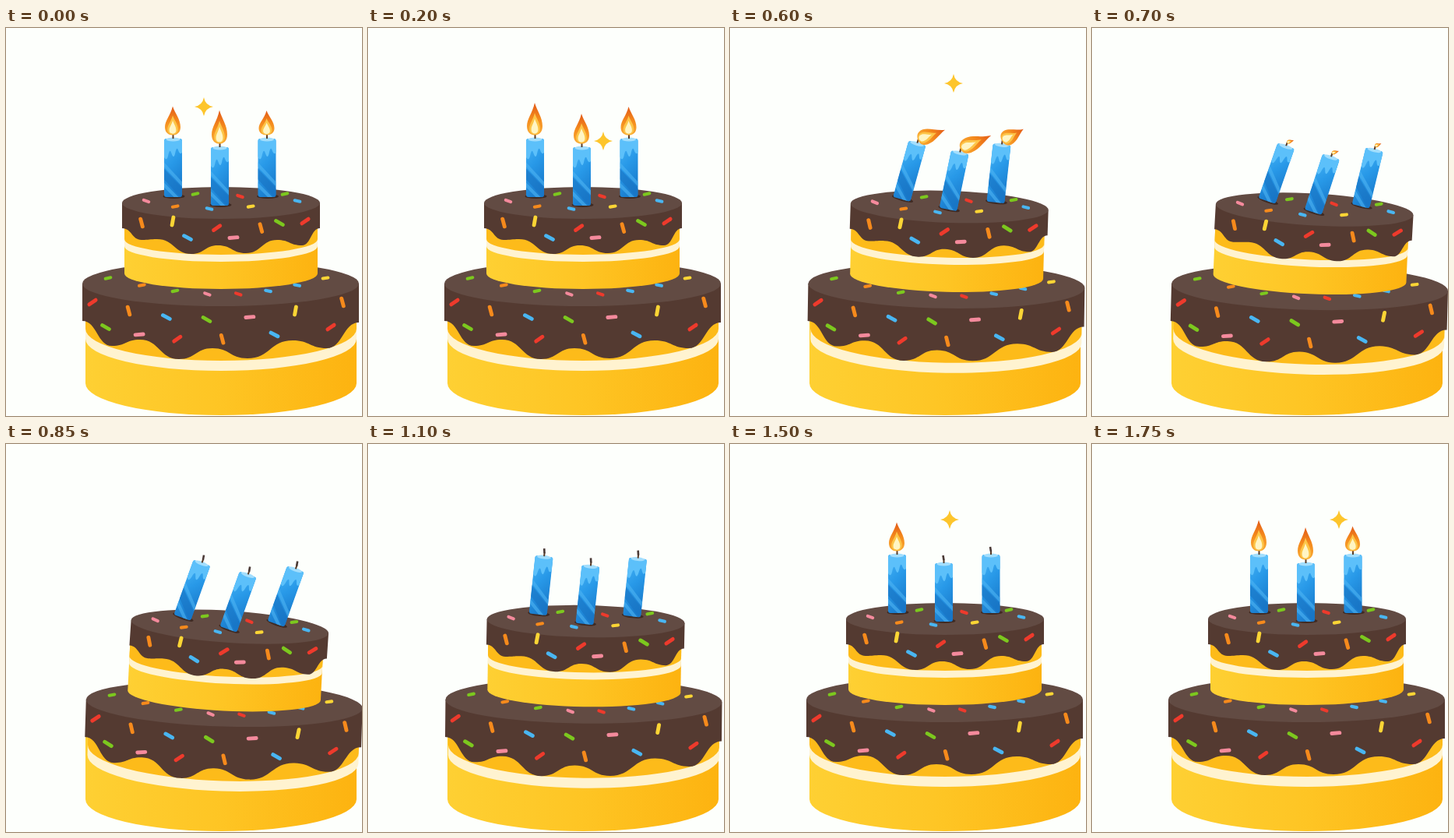
An HTML page that plays this animation: 457x498 px, repeating every 1800 ms.

```html
<!DOCTYPE html>
<html lang="en">
<head>
<meta charset="utf-8">
<title>Birthday cake</title>
<style>
  html, body { margin: 0; width: 100%; height: 100%; overflow: hidden; background: #fdfffc; }
  svg { display: block; width: 457px; height: 498px; }
</style>
</head>
<body>
<svg viewBox="0 0 457 498">
  <defs>
    <linearGradient id="sponge">
      <stop offset="0" stop-color="#fed033"/>
      <stop offset=".5" stop-color="#fec524"/>
      <stop offset="1" stop-color="#fdb310"/>
    </linearGradient>
    <linearGradient id="wax" x2=".35" y2="1">
      <stop offset="0" stop-color="#48b4f5"/>
      <stop offset=".5" stop-color="#2899e8"/>
      <stop offset="1" stop-color="#1a7ccd"/>
    </linearGradient>
    <linearGradient id="fire" x2="0" y2="1">
      <stop offset="0" stop-color="#e25a18"/>
      <stop offset=".5" stop-color="#f48a1c"/>
      <stop offset="1" stop-color="#f9ac35"/>
    </linearGradient>
    <clipPath id="stick"><rect x="-11.5" y="-74" width="23" height="75" rx="3"/></clipPath>
    <path id="drop" d="M0-40C3-30 10-22 10-11C10-3 5 0 0 0S-10-3-10-11C-10-20-3-27 0-40Z"/>
    <g id="flame">
      <use href="#drop" fill="url(#fire)"/>
      <use href="#drop" fill="#fdc548" transform="translate(0 -1) scale(.68 .66)"/>
      <use href="#drop" fill="#fff5c4" transform="translate(0 -2) scale(.44 .46)"/>
    </g>
    <g id="candle">
      <ellipse cx="1" rx="14" ry="3" fill="#3f2a23"/>
      <g clip-path="url(#stick)">
        <path d="M-12-74H12V4H-12Z" fill="url(#wax)"/>
        <path d="M-12-36L12-10V4L-12-22Z" fill="#1873c4" opacity=".6"/>
        <path d="M-12-44L12-18V-12L-12-38ZM-12-18L8 2H2L-12-12Z" fill="#4db4f4" opacity=".6"/>
        <path d="M-12-74H12V-57Q9-52 7-58Q5-65 3-57Q1-46-2-55Q-4-62-6-54Q-8-43-12-51Z" fill="#5cc0fa"/>
      </g>
      <ellipse cy="-73" rx="9" ry="2.4" fill="#a3defd"/>
      <path d="M0-74V-79" stroke="#5a3c28" stroke-width="2"/>
    </g>
  </defs>
  <g id="scene"></g>
  <path id="spark" fill="#fdc52c" d="M0-12Q1.8-1.8 12 0Q1.8 1.8 0 12Q-1.8 1.8-12 0Q-1.8-1.8 0-12Z"/>
</svg>
<script>
const LOOP = 1800, STEP = 50;
const scene = document.getElementById('scene'), spark = document.getElementById('spark');

function add(parent, tag, attrs = {}) {
  const el = document.createElementNS('http://www.w3.org/2000/svg', tag);
  for (const k in attrs) el.setAttribute(k, attrs[k]);
  return parent.appendChild(el);
}

// Cylinder wall with a rounded front edge at both ends
function band(parent, [x0, x1], bow, top, bottom, fill) {
  const arc = (sweep, x, y) => `A${(x1 - x0) / 2} ${bow} 0 0 ${sweep} ${x} ${y}`;
  add(parent, 'path', { fill, d: `M${x0} ${top}${arc(0, x1, top)}V${bottom}${arc(1, x0, bottom)}Z` });
}

// Sponge wall, filled up to its straight upper edge
function sponge(parent, [x0, x1], bow, top, bottom, fill) {
  add(parent, 'path', { fill, d: `M${x0} ${top}V${bottom}A${(x1 - x0) / 2} ${bow} 0 0 0 ${x1} ${bottom}V${top}Z` });
}

// Icing whose lower edge swings smoothly between the given crests
function icing(parent, cy, ry, crests) {
  const [x0, y0] = crests[0], x1 = crests[crests.length - 1][0];
  let d = `M${x0} ${cy}V${y0}`;
  for (let i = 1; i < crests.length; i++) {
    const [px, py] = crests[i - 1], [x, y] = crests[i], mid = (px + x) / 2;
    d += `C${mid} ${py} ${mid} ${y} ${x} ${y}`;
  }
  add(parent, 'path', { d: d + `V${cy}Z`, fill: '#543a31' });
  add(parent, 'ellipse', { cx: (x0 + x1) / 2, cy, rx: (x1 - x0) / 2, ry, fill: '#624b43' });
}

// Each colour has its own angle on the side and on the top
const sugar = {
  p: { color: '#f48a9c', side: -5, top: 20 },
  g: { color: '#7cc81e', side: 30, top: -12 },
  r: { color: '#ee3a2c', side: -35, top: 18 },
  o: { color: '#f68a1c', side: 75, top: -11 },
  b: { color: '#49b6f2', side: 28, top: 12 },
  y: { color: '#fbd535', side: -80, top: -9 }
};

// A row of sprinkles from x0 to x1, sagging by `sag` and shifted by `shift` in the middle
function sprinkles(parent, face, kinds, x0, x1, y, sag, shift = 0) {
  const half = face === 'top' ? 3.4 : 5;
  [...kinds].forEach((kind, i) => {
    const u = i / (kinds.length - 1), bulge = Math.sin(Math.PI * u), s = sugar[kind];
    add(parent, 'path', {
      d: `M${-half} 0H${half}`, stroke: s.color, 'stroke-width': half / 2 + 2.4, 'stroke-linecap': 'round',
      transform: `translate(${x0 + (x1 - x0) * u + shift * bulge} ${y + sag * bulge}) rotate(${s[face]})`
    });
  });
}

const cream = '#fff3d0', shade = '#fdbb1a';

const wide = [102, 450];
sponge(scene, wide, 41, 376, 456, 'url(#sponge)');
const lower = add(scene, 'g');
sponge(lower, wide, 41, 372, 388, shade);
band(lower, wide, 41, 386, 399, cream);
icing(lower, 328, 29, [[98, 376], [136, 408], [172, 400], [222, 425], [265, 411],
  [310, 424], [368, 401], [412, 411], [453, 378]]);
sprinkles(lower, 'top', 'gogprbby', 131, 410, 321, 21, 8);
sprinkles(lower, 'side', 'robgpyo', 111, 432, 352, 22, -14);
sprinkles(lower, 'side', 'gprobr', 128, 417, 384, 16, -25);

const narrow = [152, 400];
const upperBase = add(scene, 'g');
sponge(upperBase, narrow, 20, 250, 315, 'url(#sponge)');
sponge(upperBase, narrow, 20, 250, 272, shade);
band(upperBase, narrow, 20, 271, 280, cream);
const upper = add(scene, 'g');
icing(upper, 224.5, 20.5, [[149, 257], [174, 272], [194, 271], [238, 290], [272, 279],
  [308, 289], [348, 272], [380, 279], [403, 257]]);
sprinkles(upper, 'top', 'grg', 243, 358, 213, 3);
sprinkles(upper, 'top', 'pobyb', 180, 374, 222, 10, -16);
sprinkles(upper, 'side', 'yror', 214, 384, 248, 10);
sprinkles(upper, 'side', 'obpg', 174, 351, 250, 22);

// lead: how early the gust arrives; relit: when the flame returns
const candles = [
  { x: 214.5, y: 216, lead: 100, relit: 1350, height: 38.5, phase: 200 },
  { x: 274.5, y: 227, lead: 30, relit: 1520, height: 40, phase: 0 },
  { x: 335, y: 216, lead: -60, relit: 1620, height: 34.5, phase: 160 }
];
for (const c of candles) {
  c.el = add(upper, 'g');
  add(c.el, 'use', { href: '#candle' });
  c.wick = add(c.el, 'path', { d: 'M0-78L-1-84', stroke: '#4a3a36', 'stroke-width': 2.6 });
  c.flame = add(c.el, 'use', { href: '#flame' });
}

// start, x, y
const sparks = [[0, 254, 101], [150, 302, 145], [550, 287, 71], [1450, 282, 97], [1700, 317, 97]];
const SPARK_LIFE = 150;

function ease(u) {
  return .5 - .5 * Math.cos(Math.PI * Math.min(1, Math.max(0, u)));
}
const gust = (t, lead = 0) => ease((t + lead - 400) / 400) - ease((t - 850) / 400);
const turn = (el, angle, x, y) => el.setAttribute('transform', `rotate(${angle} ${x} ${y})`);
const show = (el, on) => el.setAttribute('visibility', on ? 'visible' : 'hidden');

function draw(t) {
  const tilt = gust(t), blowing = t < 1000;
  turn(lower, 1.8 * tilt, 100, 480);
  turn(upperBase, 2.9 * tilt, 130, 400);
  turn(upper, 3.8 * tilt, 130, 400);

  for (const c of candles) {
    const lit = blowing ? 1 - ease((t - 600) / 150) : ease((t - c.relit) / 150);
    const height = lit * (c.height + 3 * Math.cos(2 * Math.PI * (t - c.phase) / 300));
    const bend = blowing ? 55 * ease((t - 450) / 150) : 0;
    c.el.setAttribute('transform', `translate(${c.x} ${c.y}) rotate(${16 * gust(t, c.lead)})`);
    c.flame.setAttribute('transform', `translate(-.5 -78.5) rotate(${bend}) scale(${lit} ${height / 40})`);
    show(c.flame, lit > 0);
    show(c.wick, lit === 0);
  }

  const s = sparks.find(([from]) => t >= from && t < from + SPARK_LIFE);
  show(spark, s);
  if (s) spark.setAttribute('transform', `translate(${s[1]} ${s[2]})`);
}

const start = performance.now();
function tick(now) {
  const t = Math.max(0, now - start) % LOOP;
  draw(Math.floor(t / STEP) * STEP);
  requestAnimationFrame(tick);
}
draw(0);
requestAnimationFrame(tick);
</script>
</body>
</html>
```
